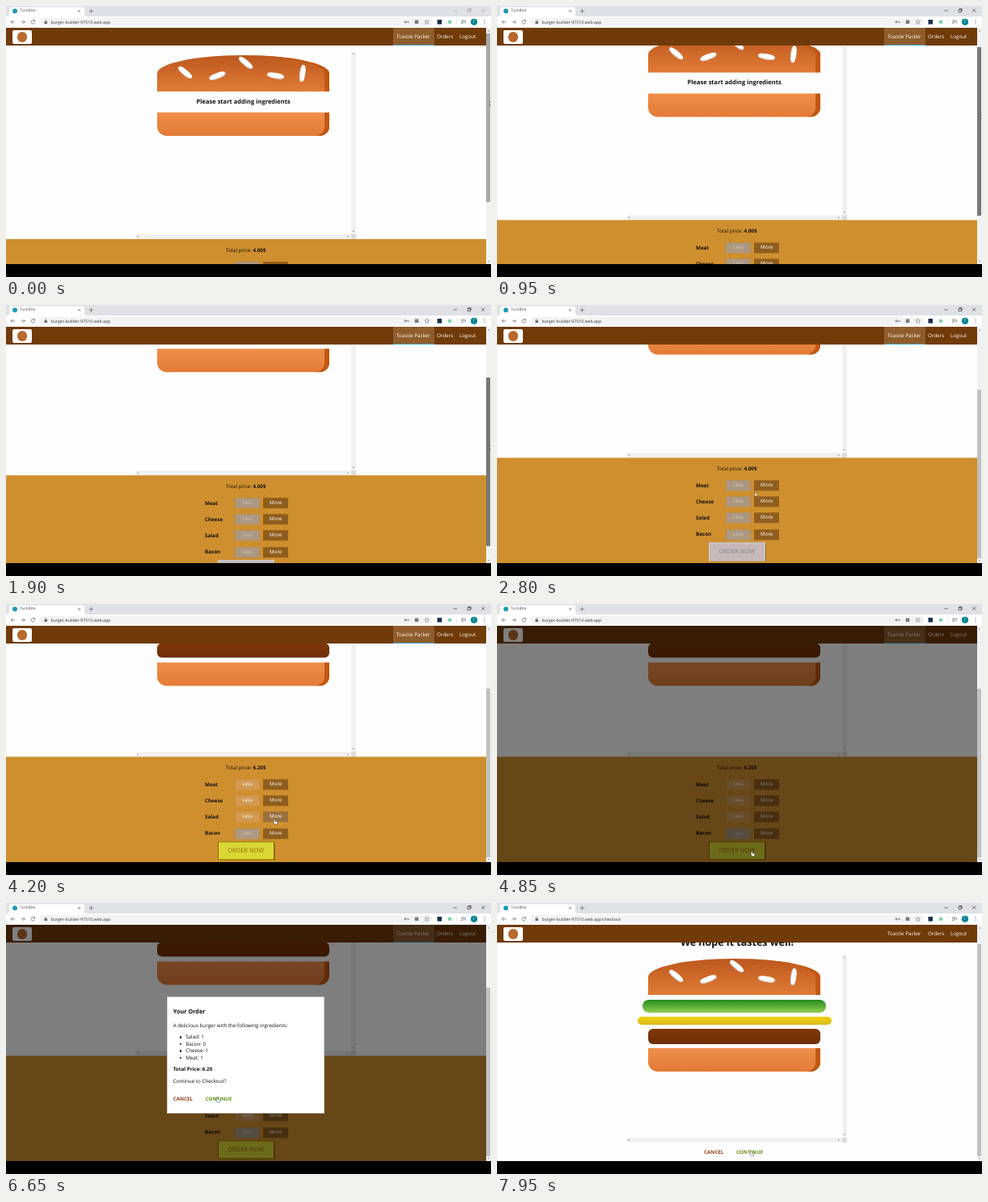
An HTML page for the animation above (8000 ms loop, 600 px wide and 336 px high).

```html
<!DOCTYPE html>
<html lang="en">
<head>
<meta charset="utf-8">
<title>Sandwich order</title>
<style>
html, body { margin: 0; width: 100%; height: 100%; overflow: hidden; background: #000; }
#stage { position: absolute; left: 0; top: 0; width: 600px; height: 336px; overflow: hidden; background: #000;
  font: 6.25px/8.5px "Open Sans", sans-serif; color: #111; text-rendering: geometricPrecision; }
#stage div, #stage svg { position: absolute; box-sizing: border-box; }
.t { white-space: nowrap; }
b { font-weight: 700; }
#page { left: 0; top: 27px; width: 593.6px; height: 293.4px; overflow: hidden; background: #fefefe; }
.view { left: 0; top: -27px; width: 594px; height: 430px; }
#header { left: 0; top: 0; width: 594px; height: 22.3px; background: #703b09; color: #fff; }
#active { left: 479px; top: 0; width: 50.5px; height: 22.3px; background: #8f5c2c; border-bottom: 1.6px solid #40a4c8; }

/* sandwich: percentages follow the scrolling box */
.box { left: 160.3px; width: 266.7px; height: 227px; overflow: hidden; text-align: center; }
.box > div { position: relative !important; margin: 2% auto; }
.top { width: 80%; height: 20%; border-radius: 50% 50% 0 0; background: linear-gradient(#bc581e, #e27b36); box-shadow: inset -5.9px 0 #c15711; }
.bottom { width: 80%; height: 13%; border-radius: 0 0 11.7px 11.7px; background: linear-gradient(#f08e4a, #e27b36); box-shadow: inset -5.9px 0 #c15711; }
.meat { width: 80%; height: 8%; border-radius: 5.9px; background: linear-gradient(#7f3608, #702e05); }
.cheese { width: 90%; height: 4.5%; border-radius: 7.8px; background: linear-gradient(#f4d004, #d6bb22); }
.salad { width: 85%; height: 7%; border-radius: 7.8px; background: linear-gradient(#228c1d, #91ce50); }
.box > .note { margin: 7.9px 0 7.5px; font: 700 7.5px/10.2px "Open Sans", sans-serif; }
.seed { width: 21.3px; height: 7.2px; border-radius: 40%; background: #fff; box-shadow: inset -.6px -1px #c9c9c9; }
.bar { background: #f1f1f1; }
.bar svg { left: 0; top: 0; }

#controls { left: 0; top: 289px; width: 594px; height: 132px; background: #cf8f2e; }
.btn { width: 31.4px; height: 13px; text-align: center; line-height: 12.6px; color: #fff; box-shadow: inset 0 0 0 .4px rgba(170,104,23,.5); }
#order { left: 262px; top: 394.3px; width: 69.5px; height: 23px; text-align: center; font-size: 7.5px; line-height: 22.4px; border: .5px solid #966909; }
#backdrop, #modalClip { left: 0; top: 27px; width: 593.6px; height: 293.4px; overflow: hidden; }
#backdrop { background: rgba(0,0,0,.5); }
#modal { left: 199px; top: 88.8px; width: 195px; height: 145.4px; background: #fff; border: .4px solid #ccc; box-shadow: .4px .4px .4px #000; }
.bullet { border-radius: 50%; background: #111; }
#track { left: 593.6px; top: 27px; width: 6.4px; height: 293.4px; background: #f1f1f1; }
#thumb { left: .4px; width: 5.4px; }
#cursor { left: 0; top: 0; overflow: visible; }
</style>
</head>
<body>
<div id="stage"></div>
<script>
const text = (x, y, s, style = '') => `<div class="t" style="left:${x}px;top:${y - 4}px;${style}">${s}</div>`;
const rect = (x, y, w, h, style, cls = '', body = '') =>
  `<div class="${cls}" style="left:${x}px;top:${y}px;width:${w}px;height:${h}px;${style}">${body}</div>`;
const bold = 'font-weight:700;';
const red = bold + 'color:#944317', green = bold + 'color:#5c9210';

const seeds = [[34.5, 22, 40], [74.5, 26, -20], [109.5, 9.5, 40], [147, 26, 10], [180, 23, 98]]
  .map(([x, y, a]) => `<div class="seed" style="left:${x - 10.6}px;top:${y - 3.6}px;transform:rotate(${a}deg)"></div>`).join('');
const sandwich = items => `<div class="top">${seeds}</div>` +
  (items.length ? items.map(i => `<div class="${i}"></div>`).join('') : '<div class="note">Please start adding ingredients</div>') +
  '<div class="bottom"></div>';

const arrow = (x, y, turn) => `<path d="M-1.2 .6L0 -.8L1.2 .6Z" fill="#777" transform="translate(${x} ${y}) rotate(${turn})"/>`;
const svg = (w, h, body) => `<svg width="${w}" height="${h}" viewBox="0 0 ${w} ${h}">${body}</svg>`;
const scrollBox = (id, y, body) => `<div class="box" id="${id}" style="top:${y}px">${body}</div>` +
  rect(427.3, y, 5.7, 227, '', 'bar', svg(5.7, 227, arrow(2.8, 3, 0) + arrow(2.8, 223.5, 180))) +
  rect(160.3, y + 227, 267, 6, '', 'bar', svg(267, 6, arrow(3, 3, -90) + arrow(263, 3, 90))) +
  rect(427.3, y + 227, 5.7, 6, 'background:#dcdcdc');

const rows = ['Meat', 'Cheese', 'Salad', 'Bacon'];
const rowY = i => 323.6 + 20.15 * i;
const rowHtml = (name, i) => text(246, rowY(i), name, bold) +
  `<div class="btn less" style="left:283px;top:${rowY(i) - 6.5}px">Less</div>` +
  `<div class="btn more" style="left:318px;top:${rowY(i) - 6.5}px">More</div>`;

const line = (d, w = .7) => `<path d="${d}" fill="none" stroke="#5f6368" stroke-width="${w}"/>`;
const dot = (x, y, r, fill) => `<circle cx="${x}" cy="${y}" r="${r}" fill="${fill}"/>`;
const browser = svg(600, 28, `
  <rect width="600" height="28" fill="#dee1e6"/>
  <path d="M1 13Q4 13 4 10V4Q4 1.5 6.5 1.5H94.5Q97 1.5 97 4V10Q97 13 100 13H600V27.5H0V13Z" fill="#fff"/>
  <rect x="41" y="15" width="487" height="9.6" rx="4.8" fill="#f1f3f4"/>
  ${dot(11, 6.3, 3, '#1f9bb5')}
  ${line('M89 4.8l3 3m0-3l-3 3M102.8 6.3h5.2m-2.6-2.6v5.2')}
  ${line('M11 19.8H6.2m2.2-2.2l-2.2 2.2l2.2 2.2M18.5 19.8h4.8m-2.2-2.2l2.2 2.2l-2.2 2.2')}
  ${line('M35 18.3A2.3 2.3 0 1 0 35.5 20.5M35.5 17v2h-2')}
  <rect x="47.5" y="19.2" width="3.4" height="2.8" fill="#5f6368"/>${line('M48.2 19.3v-.8a1 1 0 0 1 2 0v.8', .5)}
  ${line('M495.5 19.8h2.8v1.2M493 19.8a1.1 1.1 0 1 0 2.2 0a1.1 1.1 0 1 0-2.2 0', .8)}
  <rect x="505.7" y="17.4" width="4.6" height="4.6" rx=".5" fill="#777b80"/>
  ${line('M520.6 17l.8 1.9 2 .1-1.5 1.3.5 2-1.8-1.1-1.8 1.1.5-2-1.5-1.3 2-.1z', .5)}
  <rect x="533.5" y="17" width="5.6" height="5.6" fill="#17324a"/>
  ${dot(549, 19.8, 2.4, '#7fd3a8')}
  <path d="M557.5 16.5v6.5" stroke="#ccc" stroke-width=".4"/>
  ${line('M563 18h4.5M563 19.8h4.5M563 21.6h2.5M568.3 18v3.6')}
  ${dot(579, 19.8, 4.1, '#00838f')}
  ${[17.6, 19.8, 22].map(y => dot(592, y, .6, '#5f6368')).join('')}
  <path id="windowKeys" d="M553.5 5.8h4.5M571 4.5h3.2v3.2h-3.2zM572 4.5v-1h3.2v3.2h-1M588.2 3.6l4 4m0-4l-4 4" fill="none" stroke-width=".6"/>`);

const modalLines = [
  [6.7, 18.6, 'Your Order', bold + 'font-size:7.3px'],
  [6.7, 34.8, 'A delicious burger with the following ingredients:'],
  ...['Salad: 1', 'Bacon: 0', 'Cheese: 1', 'Meat: 1'].map((s, i) => [22.2, 49.4 + 8.5 * i, s]),
  [6.7, 89.2, 'Total Price: 6.20', bold],
  [6.7, 103.9, 'Continue to Checkout?'],
  [6.7, 126.3, 'CANCEL', red],
  [46.7, 126.3, 'CONTINUE', green]
];
const bullets = [0, 1, 2, 3].map(i => rect(15, 48.7 + 8.5 * i, 2.2, 2.2, '', 'bullet')).join('');

const $ = id => document.getElementById(id);
$('stage').innerHTML = browser +
  text(17, 6.2, 'TuckBite', 'font-size:5px;color:#555') +
  text(55.5, 19.8, '<span id="url"></span>', 'font-size:5.2px;color:#333') +
  text(577.6, 19.6, 'T', 'font-size:4.8px;color:#fff') + `
  <div id="page">
    <div class="view" id="builder">
      ${scrollBox('stack', 55.5, '')}
      <div id="controls"></div>
      ${text(272, 303.4, 'Total price: <b id="price"></b>')}
      ${rows.map(rowHtml).join('')}
      <div id="order">ORDER NOW</div>
    </div>
    <div class="view" id="checkout">
      ${text(0, 67.5, 'We hope it tastes well!', bold + 'font-size:12.5px;width:594px;text-align:center')}
      ${scrollBox('done', 82.7, sandwich(['salad', 'cheese', 'meat']))}
      ${text(256, 328, 'CANCEL', red)}${text(296, 328, 'CONTINUE', green)}
    </div>
    <div id="header">
      <div id="active"></div>
      ${rect(8, 2.8, 23.6, 17.6, 'background:#fff;border-radius:2px')}
      ${rect(13.5, 5.3, 12.6, 12.6, 'background:#b9692c;border-radius:50%')}
      ${text(483, 11.2, 'Toastie Packer')}${text(533, 11.2, 'Orders')}${text(561, 11.2, 'Logout')}
    </div>
  </div>
  <div id="backdrop"></div>
  <div id="modalClip"><div id="modal">${bullets}${modalLines.map(l => text(...l)).join('')}</div></div>
  <div id="track">${svg(6, 293, arrow(3, 3.8, 0) + arrow(3, 289.8, 180))}<div id="thumb"></div></div>
  <svg id="cursor" width="8" height="9"><path fill="#fff" stroke="#111" stroke-width=".4"/></svg>`;

const LOOP = 8000, DRAG = [400, 2200], MAX_SCROLL = 99.6;
const clicks = { meat: 3100, cheese: 3500, salad: 3900, order: 4843, checkout: 6750 };
const costs = { meat: 1.3, cheese: .4, salad: .5 };
const cursorPath = [[2200, 598.5, 189], [2350, 598.5, 189], [2800, 319, 232], [3000, 332, 226], [3200, 332, 226],
  [3420, 332, 247], [3600, 332, 247], [3820, 332, 267], [4250, 332, 267], [4700, 315, 306.5],
  [5300, 315, 306.5], [6100, 261, 241], [6950, 261, 241], [7700, 314, 307.5], [8000, 314, 307.5]];
const ARROW = 'M0 0V5.6L1.4 4.4L2.3 6.4L3.1 6L2.2 4.1H4Z';
const HAND = 'M.2 0Q1 0 1 .8V2.5L3.4 3Q4 3.2 3.9 4L3.4 6.3H.8L-1 4Q-.8 3.2 -.6 3.6V.8Q-.6 0 .2 0Z';

const clamp = p => Math.max(0, Math.min(1, p));
const show = (id, on) => $(id).style.display = on ? '' : 'none';

function scrollAt(t) {
  if (t < 1450) return 45 * clamp((t - DRAG[0]) / (1450 - DRAG[0]));
  return 45 + (MAX_SCROLL - 45) * clamp((t - 1450) / (DRAG[1] - 1450));
}

function cursorAt(t) {
  if (t < DRAG[1]) return [598.5, 118 + scrollAt(t) * .714];
  const i = cursorPath.findIndex(k => k[0] > t);
  const [t0, x0, y0] = cursorPath[i - 1], [t1, x1, y1] = cursorPath[i];
  const p = (t - t0) / (t1 - t0), e = p * p * (3 - 2 * p);
  return [x0 + (x1 - x0) * e, y0 + (y1 - y0) * e];
}

const inside = (x, y, left, top, w, h) => x > left && x < left + w && y > top && y < top + h;
let shown = null;

function draw(t) {
  const checkout = t >= clicks.checkout, modal = t >= clicks.order && !checkout;
  const free = !checkout && !modal;
  const added = ['salad', 'cheese', 'meat'].filter(i => t >= clicks[i]);
  const scroll = scrollAt(t), [x, y] = cursorAt(t);
  const dragging = t >= DRAG[0] && t < DRAG[1];

  show('builder', !checkout);
  show('active', !checkout);
  show('checkout', checkout);
  show('backdrop', modal);
  show('modalClip', modal);
  $('url').textContent = 'burger-builder-97510.web.app' + (checkout ? '/checkout' : '');
  $('windowKeys').setAttribute('stroke', t < DRAG[0] ? '#999' : '#222');
  $('builder').style.transform = `translateY(${-scroll}px)`;
  $('checkout').style.transform = 'translateY(-19px)';

  if (added.join() !== shown) {
    $('stack').innerHTML = sandwich(added);
    shown = added.join();
  }
  $('price').textContent = added.reduce((sum, i) => sum + costs[i], 4).toFixed(2) + '$';

  let hand = checkout ? inside(x, y, 294, 303, 37, 13)
    : modal && (t < 5300 || inside(x, y, 244, 236, 37, 13));
  document.querySelectorAll('.less').forEach((b, i) => {
    const on = added.includes(rows[i].toLowerCase());
    b.style.background = on ? '#d39952' : '#ac9980';
    b.style.color = on ? '#fff' : '#ccc';
  });
  document.querySelectorAll('.more').forEach((b, i) => {
    const over = free && inside(x, y, 318, rowY(i) - 6.5 - scroll, 31.4, 13);
    b.style.background = over ? '#99703f' : '#8f5e1e';
    hand = hand || over;
  });

  const ready = added.length > 0, overOrder = free && ready && inside(x, y, 262, 294.8, 69.5, 23);
  hand = hand || overOrder;
  Object.assign($('order').style, {
    background: overOrder ? '#a0db41' : ready ? '#dad735' : '#c6b9b9',
    color: ready ? '#966909' : '#888',
    borderColor: ready ? '#966909' : '#ccc',
    boxShadow: '.6px .6px .8px #966909',
    transform: `scale(${1 + .1 * Math.sin(Math.PI * clamp((t - clicks.meat) / 300))})`
  });

  const left = (1 - clamp((t - clicks.order) / 300)) ** 2;
  $('modal').style.transform = `translateY(${-293 * left}px)`;
  $('modal').style.opacity = 1 - left;

  Object.assign($('thumb').style, {
    top: (checkout ? 24 : 7 + scroll * .714) + 'px',
    height: (checkout ? 263 : 209) + 'px',
    background: dragging ? '#787878' : x > 594 ? '#a8a8a8' : '#c1c1c1'
  });
  $('cursor').style.transform = `translate(${x}px,${y}px)`;
  $('cursor').firstChild.setAttribute('d', hand ? HAND : ARROW);
}

const start = performance.now();
(function tick() {
  draw((performance.now() - start) % LOOP);
  requestAnimationFrame(tick);
})();
</script>
</body>
</html>
```
